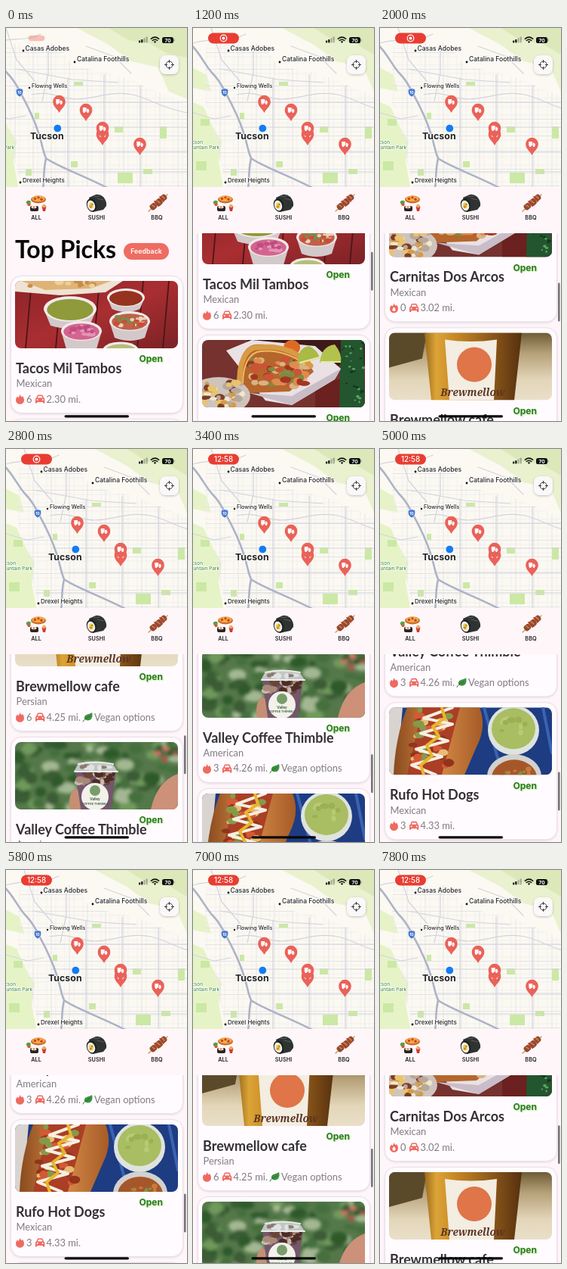
Animation, 240 px wide and 519 px high, one loop 8000 ms. Source, as an HTML page:

```html
<!DOCTYPE html>
<html lang="en">
<head>
<meta charset="utf-8">
<title>Food truck finder</title>
<style>
  html, body { margin: 0; width: 100%; height: 100%; overflow: hidden; background: #fff6fa; }
  #stage { display: block; width: 100vw; height: 100vh; }
  text { font-family: Lato, sans-serif; }
  .ui, .label, .open { font-family: Inter, sans-serif; }
  .label { font-weight: 500; fill: #222; stroke: #fff; stroke-width: 1.6; paint-order: stroke; stroke-linejoin: round; }
  .title { font-size: 18px; font-weight: 700; fill: #333136; }
  .info { font-size: 12.9px; fill: #807c84; }
  .open { font-size: 12px; font-weight: 700; fill: #277d1e; text-shadow: 1px 1px 2px #c4e6a4; }
  .category { font-size: 7.3px; font-weight: 600; fill: #222; text-anchor: middle; }
  .card { fill: #fffbfe; stroke: #e9e1e8; filter: drop-shadow(0 1px 1.5px #b9b0ba70); }
  .line { fill: none; stroke-linecap: round; stroke-linejoin: round; }
</style>
</head>
<body>
<svg id="stage" viewBox="0 0 240 519" preserveAspectRatio="none">
  <defs>
    <clipPath id="listClip"><rect y="271" width="240" height="248"/></clipPath>
    <clipPath id="mapClip"><rect width="240" height="210"/></clipPath>
    <clipPath id="photoClip"><rect width="216" height="89" rx="8"/></clipPath>
    <filter id="blur" x="-20%" y="-20%" width="140%" height="140%"><feGaussianBlur stdDeviation="2.2"/></filter>
    <filter id="lift" x="-30%" y="-30%" width="160%" height="170%"><feDropShadow dx="0" dy="1" stdDeviation="1.5" flood-opacity=".25"/></filter>
    <pattern id="streets" width="24" height="22" patternUnits="userSpaceOnUse">
      <path d="M0 5H24M0 16H24M6 0V22M18 0V22" stroke="#efedef" stroke-width=".7"/>
      <path d="M0 10.5H24M12 0V22" stroke="#e2e1e7" stroke-width=".9"/>
    </pattern>
    <linearGradient id="amber" x2="1"><stop stop-color="#9a6a1c"/><stop offset=".12" stop-color="#dca437"/><stop offset=".3" stop-color="#c98a25"/><stop offset=".8" stop-color="#7a4a16"/><stop offset="1" stop-color="#55300f"/></linearGradient>
    <linearGradient id="cafe" x2="0" y2="1"><stop stop-color="#6d5c36"/><stop offset=".3" stop-color="#b5a078"/><stop offset=".7" stop-color="#e3d6b9"/><stop offset="1" stop-color="#e9dfc9"/></linearGradient>
    <linearGradient id="bun" x2="1"><stop stop-color="#8a4a1e"/><stop offset=".5" stop-color="#d58b47"/><stop offset="1" stop-color="#a65b27"/></linearGradient>
    <linearGradient id="table" x2="1" y2="1"><stop stop-color="#8c2428"/><stop offset=".5" stop-color="#a92e31"/><stop offset="1" stop-color="#7a2226"/></linearGradient>
    <g id="pin">
      <path d="M0 13C-3 7-8.3 5-8.3-2A8.3 8.3 0 0 1 8.3-2C8.3 5 3 7 0 13Z" fill="#ea6259"/>
      <path d="M-4.2-5H.6V.6H-4.2ZM1.2-3.2H3L4.3-1.4V.6H1.2Z" fill="#fff"/>
      <circle cx="-2.4" cy=".9" r="1.2" fill="#fff"/><circle cx="2.5" cy=".9" r="1.2" fill="#fff"/>
    </g>
    <path id="flame" d="M5.5 0C6 2.4 7 3 8 4 8.6 3.5 8.6 2.8 8.6 2.3 10.3 4 11 6 11 8A5.5 5.3 0 0 1 0 8C0 5.3 1.4 4.5 2 3 2.6 3.5 3 4 3.2 4.7 4.8 3.4 5.3 2 5.5 0Z" fill="#ee6a61"/>
    <g id="hollow"><use href="#flame"/><path d="M5.6 5.5C8.4 8 8 11 5.5 11.2 3 11 2.6 8 5.6 5.5Z" fill="#fffbfe"/></g>
    <g id="car">
      <path d="M2.4 1.2Q2.8 0 4 0H8.3Q9.5 0 10 1.2L11 4Q12.3 4.5 12.3 6V11H10V9.4H2.3V11H0V6Q0 4.5 1.3 4Z" fill="#ee6a61"/>
      <path d="M2.9 4 3.8 1.6H8.5L9.4 4Z" fill="#fffbfe"/>
      <circle cx="2.6" cy="6.6" r="1" fill="#fffbfe"/><circle cx="9.7" cy="6.6" r="1" fill="#fffbfe"/>
    </g>
    <g id="leaf">
      <path d="M2 8C1 2 8 3 12 0 14 7 10 12 4 10Z" fill="#3c9140"/>
      <path d="M0 12C2 8 5 7 9 5" class="line" stroke="#286b2c"/>
    </g>
  </defs>

  <rect width="240" height="519" fill="#fff6fa"/>

  <g clip-path="url(#listClip)">
    <g id="list">
      <text x="12" y="304" font-size="32" font-weight="700" fill="#080808">Top Picks</text>
      <rect x="156" y="284" width="60" height="22" rx="11" fill="#ef6c62"/>
      <text class="ui" x="186" y="298.2" font-size="8.8" font-weight="600" fill="#fff" text-anchor="middle">Feedback</text>
      <g id="cards"></g>
    </g>
  </g>
  <rect id="thumb" x="236" width="2.6" height="51" rx="1.3" fill="#77727a"/>

  <g clip-path="url(#mapClip)">
    <g id="map">
      <rect x="-5" width="275" height="210" fill="#fbf9f1"/>
      <path d="M-5 96 14 104 26 130 38 150 34 176 40 210H-5ZM-5 50 18 62 24 84-5 78Z" fill="#e6f3c6"/>
      <path d="M118 0H270V96L240 84 226 52 190 44 160 22Z" fill="#eaf1cf"/>
      <path d="M160 0H270V40L238 34 214 20 186 16Z" fill="#dde8ba"/>
      <path d="M18 20H92L112 50 172 62 225 84 270 104V210H44L30 150 14 90Z" fill="url(#streets)"/>
      <path d="M110 176h9v8h-9ZM168 130h11v8h-11ZM228 130h9v16h-9ZM114 71h12v5h-12ZM172 191h20v14h-20ZM62 112h6v8h-6ZM10 120h12v9h-12ZM4 176h14v12h-14ZM206 186h12v7h-12ZM50 186h8v9h-8Z" fill="#cbe8a5"/>
      <g class="line" stroke="#d3d3de" stroke-width="1.2">
        <path d="M24 0 38 42 62 70M80 30V60L72 96M106 66V210M154 62V210M202 76V210M36 54 112 68 172 72M50 98H264M60 131H264M72 163H264M40 190H264"/>
        <path d="M58 88C84 82 96 94 118 94S166 82 192 88 224 104 264 112M0 20C30 12 52 18 70 8M130 24 168 38 190 60M0 112 28 120 50 116"/>
      </g>
      <g class="line" stroke="#adb3c7" stroke-width="2.6">
        <path d="M-5 20C8 30 16 50 26 60S38 76 44 87 60 116 67 138 72 160 77 172C90 182 130 196 160 212M77 172C73 190 75 200 73 212"/>
      </g>
      <path d="M37.5 81Q42 78.5 46.5 81 48 88 42 91 36 88 37.5 81Z" fill="#4677cd" stroke="#fff" stroke-width=".6"/>
      <text class="ui" x="42" y="87" font-size="5.2" font-weight="700" fill="#fff" text-anchor="middle">10</text>
      <g fill="#111"><circle cx="47" cy="30" r="1.4"/><circle cx="115" cy="45" r="1.4"/><circle cx="55" cy="79" r="1.2"/><circle cx="43" cy="204" r="1.4"/></g>
      <text class="label" x="49.5" y="30" font-size="8.5">Casas Adobes</text>
      <text class="label" x="118" y="44" font-size="8.5">Catalina Foothills</text>
      <text class="label" x="58" y="79" font-size="7.2">Flowing Wells</text>
      <text class="label" x="46" y="203.5" font-size="8">Drexel Heights</text>
      <g font-size="6.4" text-anchor="end">
        <text class="label" x="13" y="153" style="fill:#4a9145">Tucson</text>
        <text class="label" x="35" y="160" style="fill:#4a9145">Mountain Park</text>
      </g>
      <text class="label" x="56" y="146.5" font-size="12.4" style="font-weight:700">Tucson</text>
      <circle cx="92.3" cy="132.5" r="5.3" fill="#147bf3" stroke="#fff" stroke-width=".8"/>
      <use href="#pin" x="94.5" y="99"/><use href="#pin" x="130" y="110"/>
      <use href="#pin" x="152" y="142"/><use href="#pin" x="152" y="134"/>
      <use href="#pin" x="201.5" y="155"/>
    </g>
  </g>

  <g id="pill">
    <rect x="20" y="6.5" width="41" height="14" rx="7" fill="#e93d33"/>
    <g id="record"><circle cx="40.5" cy="13.5" r="4.3" fill="none" stroke="#fff" stroke-width="1.2"/><circle cx="40.5" cy="13.5" r="2" fill="#fff"/></g>
    <text id="clock" class="ui" x="40.5" y="17" font-size="9.8" font-weight="500" fill="#fff" text-anchor="middle">12:58</text>
  </g>
  <g fill="#111">
    <rect x="176" y="16.5" width="2.2" height="3" rx=".7"/><rect x="179.2" y="15" width="2.2" height="4.5" rx=".7"/>
    <g opacity=".3"><rect x="182.4" y="13.3" width="2.2" height="6.2" rx=".7"/><rect x="185.6" y="11.5" width="2.2" height="8" rx=".7"/></g>
    <path d="M197.5 20 195.8 18Q197.5 16.6 199.2 18Z"/>
    <path d="M194.2 16.5Q197.5 13.8 200.8 16.5M192.3 14.3Q197.5 10 202.7 14.3" class="line" stroke="#111" stroke-width="1.5"/>
    <rect x="207" y="12" width="15" height="8" rx="2.6"/><rect x="222.5" y="14.5" width="1" height="3" rx=".5" opacity=".5"/>
  </g>
  <text class="ui" x="214.5" y="18.5" font-size="6.6" font-weight="700" fill="#fff" text-anchor="middle">70</text>
  <rect x="204" y="36" width="25" height="25" rx="8" fill="#faf8f8" filter="url(#lift)"/>
  <path d="M212 48.5a4.5 4.5 0 1 0 9 0a4.5 4.5 0 1 0-9 0M216.5 42.5V45.5M216.5 51.5V54.5M210.5 48.5H213.5M219.5 48.5H222.5" class="line" stroke="#333" stroke-width="1"/>

  <rect y="210" width="240" height="61" fill="#fff6fa"/>
  <g>
    <ellipse cx="43" cy="226.5" rx="10" ry="5" fill="#c9682b"/><ellipse cx="43" cy="225.5" rx="8.5" ry="3.8" fill="#f0ae40"/>
    <circle cx="38.5" cy="225.5" r="1.7" fill="#d13c2a"/><circle cx="43" cy="223.8" r="1.6" fill="#d13c2a"/><circle cx="47" cy="226.3" r="1.7" fill="#d13c2a"/>
    <path d="M26.5 230Q29 226 33 229L32 233H28Z" fill="#5b9d40"/><path d="M28 232H33L32 235H29Z" fill="#d75c31"/>
    <rect x="32" y="235" width="11" height="7" rx="2" fill="#2b2523"/><ellipse cx="37" cy="236.5" rx="3.6" ry="1.8" fill="#f7eee0"/><circle cx="37" cy="236.5" r="1.2" fill="#ea7a35"/>
    <path d="M47.5 235.5H53.5L52 242H49Z" fill="#cf3a31"/><circle cx="50.5" cy="235" r="2.3" fill="#e9ac5b"/>
  </g>
  <g>
    <path d="M110 224 119 220Q124 219 129 223 134 229 133 235L129 240 115 243Z" fill="#2f3331"/>
    <path d="M117 222.5 124 222M121 225 129 227" class="line" stroke="#5a635e"/>
    <ellipse cx="113.5" cy="234" rx="6.5" ry="9" transform="rotate(-18 113.5 234)" fill="#1d201e"/>
    <ellipse cx="113" cy="234.5" rx="5" ry="7" transform="rotate(-18 113 234.5)" fill="#f5f0e6"/>
    <ellipse cx="113" cy="234.5" rx="2.8" ry="3.8" fill="#f2c83e"/><circle cx="112.3" cy="236" r="1.6" fill="#e57b37"/><circle cx="114.3" cy="233" r="1.2" fill="#6fa845"/>
  </g>
  <g>
    <path d="M189 242 214 220" class="line" stroke="#c89a62" stroke-width="1.5"/>
    <g fill="#92492c"><rect x="191" y="232" width="9" height="8" rx="3" transform="rotate(-40 195 236)"/><rect x="198" y="226" width="9" height="9" rx="3" transform="rotate(-40 202 230)"/><rect x="205" y="220" width="8" height="8" rx="3" transform="rotate(-40 209 224)"/></g>
    <path d="M194 234 197 236M200 228 204 231M207 222 210 225" class="line" stroke="#c97a4d" stroke-width="2"/>
    <path d="M197 229 202 235M204 223 209 229" class="line" stroke="#b53d2c" stroke-width="1.8"/>
  </g>
  <text class="ui category" x="40" y="253.3">ALL</text>
  <text class="ui category" x="120" y="253.3">SUSHI</text>
  <text class="ui category" x="200" y="253.3">BBQ</text>
  <rect x="77.5" y="511.2" width="85.5" height="3.2" rx="1.6" fill="#080808"/>
</svg>

<script>
const el = id => document.getElementById(id);
const clamp = x => Math.min(1, Math.max(0, x));

let seed = 7;
const rand = () => (seed = seed * 16807 % 2147483647) / 2147483647;
const box = (color, x = 0, y = 0, w = 216, h = 89) => `<rect x="${x}" y="${y}" width="${w}" height="${h}" fill="${color}"/>`;
const oval = (x, y, rx, ry, color) => `<ellipse cx="${x}" cy="${y}" rx="${rx}" ry="${ry}" fill="${color}"/>`;
const shape = (d, color) => `<path d="${d}" fill="${color}"/>`;
const stroke = (d, color, width) => `<path class="line" d="${d}" stroke="${color}" stroke-width="${width}"/>`;
const scatter = (n, x, y, w, h, r, colors) => Array.from({ length: n }, (_, i) =>
  oval(x + rand() * w, y + rand() * h, r * (.6 + rand()), r * (.5 + rand() * .6), colors[i % colors.length])).join('');

// Salsa cup seen at an angle
const cup = (x, y, r, depth, color) =>
  shape(`M${x - r} ${y}L${x - r * .74} ${y + depth}Q${x} ${y + depth + 8} ${x + r * .74} ${y + depth}L${x + r} ${y}Z`, '#d3c8ca') +
  oval(x, y, r, r * .48, '#f1ebe9') + oval(x, y + 1, r * .88, r * .4, color);

const photos = {
  salsas: () => box('url(#table)') +
    [22, 62, 112, 170, 204].map(x => stroke(`M${x} 0L${x - 8} 89`, '#4c1519', 1.8)).join('') +
    shape('M0 0H143L120 15 60 19 0 14Z', '#eee3d4') + shape('M8 0H128L100 10 40 12Z', '#dfb276') +
    scatter(12, 20, 0, 90, 7, 4, ['#c98c4c', '#ecd09a']) +
    cup(73, 37, 35, 22, '#8f9a3a') + cup(147, 22, 25, 15, '#963220') +
    cup(152, 53, 27, 22, '#c0614a') + scatter(22, 133, 47, 38, 12, 3, ['#cf4a35', '#e6d3b8', '#71904a']) +
    cup(88, 66, 27, 24, '#d3648f') + scatter(16, 70, 60, 36, 12, 3, ['#e594b5', '#c04d80']) +
    cup(140, 92, 24, 12, '#b4bf78'),

  tacos: () => box('#75322f') + box('#3d1a18', 60, 0, 156, 34) + box('#6a211f', 150, 52, 66, 37) +
    shape('M184 0H214L216 89H182Z', '#23552f') + scatter(30, 186, 2, 28, 82, 1.6, ['#5aa361', '#10391f']) +
    shape('M32 14 66 0 150 8 184 38 176 52 119 86 84 80Z', '#e9e1e4') + shape('M62 70 119 86 176 52 184 38 119 74Z', '#c9bdc8') +
    oval(119, 10, 11, 10, '#dc6a25') + oval(115, 16, 7, 5, '#eda03e') +
    shape('M48 62C46 26 56 4 76 6 104 4 138 22 148 42L116 68 62 70Z', '#b5662c') +
    scatter(60, 62, 26, 78, 36, 5, ['#a53522', '#d9b384', '#c95535', '#7c8c40', '#e08a4d']) +
    stroke('M50 62C48 30 58 8 76 10 104 6 130 18 144 34', '#d99a45', 7) +
    stroke('M54 58C54 34 62 16 78 15 100 12 124 22 136 32', '#efbb62', 2) +
    shape('M127 32Q126 10 142 8 154 14 156 24Z', '#a9ba45') + shape('M156 30Q158 8 176 6 186 18 184 30Z', '#b3c24e') +
    stroke('M130 30 155 23M158 29 183 29', '#e6eba2', 2) +
    oval(22, 74, 42, 25, '#cfc4bd') + scatter(40, 0, 56, 54, 32, 4.5, ['#efe6cd', '#d59a46', '#7d3d28', '#e9c36e', '#b8a79b']),

  brew: () => box('url(#cafe)') + shape('M0 0H50L44 34 0 46Z', '#5a4a2a') +
    shape('M47 0H176L166 89H56Z', 'url(#amber)') + shape('M74 9Q108 14 143 9L139 89H80Z', '#f3ede2') +
    oval(113, 42, 23, 23, '#df7548') +
    `<text x="111" y="84" text-anchor="middle" font-size="13.5" font-weight="700" font-style="italic" fill="#5d3524" style="font-family:'Noto Serif',serif">Brewmellow</text>`,

  iced: () => box('#55784a') + `<g filter="url(#blur)">` +
    scatter(110, 0, 0, 216, 89, 8, ['#2f5a2c', '#6f9a5c', '#a3b892', '#44703c', '#3a5b36']) +
    scatter(4, 186, 8, 28, 16, 4, ['#b9504c', '#d77468']) + `</g>` +
    shape('M180 89Q188 52 216 42V89Z', '#cd9079') + oval(80, 80, 8, 18, '#c58f74') +
    shape('M80 39H134L126 95H88Z', '#75566c') + scatter(34, 84, 38, 46, 16, 4, ['#4d2d25', '#a98a78', '#6a4535', '#c9b8b4']) +
    shape('M83 30Q106 23 130 30L136 39H78Z', '#c3c6c4') + scatter(8, 88, 30, 38, 5, 4, ['#8b7a70', '#dfe2e0']) +
    stroke('M79 39H136M84 29Q106 24 130 29', '#eceeec', 2) +
    oval(106, 72, 18, 18, '#f2f1ea') + oval(106, 64, 7, 7, '#7a9c6b') +
    `<g text-anchor="middle" font-weight="700" fill="#355d3d"><text x="106" y="77" font-size="5">Valley</text><text x="106" y="82.5" font-size="4.3">COFFEE THIMBLE</text></g>`,

  hotdog: () => box('#1d3c82') + stroke('M126 0 150 89M204 0 216 60', '#3a63b2', 4) +
    shape('M0 0H18L10 89H0Z', '#d9d4cf') +
    shape('M24 0H120Q130 25 116 52L100 89H6Q8 40 24 0Z', 'url(#bun)') +
    shape('M44 0H94L70 89H24Z', '#aa3f25') + scatter(36, 30, 2, 50, 84, 5, ['#d65835', '#e7bc75', '#92331c', '#86994a']) +
    stroke('M84 0 46 14 84 22 42 34 78 44 36 55 70 65 30 76 62 89', '#f6efe0', 4) +
    stroke('M70 0 74 14 58 25 66 38 50 50 57 64 42 76 46 89', '#e9b52c', 4) +
    oval(165, 30, 34, 33, '#dfe3df') + oval(165, 28, 29, 27, '#a9bd62') + scatter(10, 147, 12, 34, 30, 4, ['#b9ca76', '#9cb052']) +
    oval(166, 91, 36, 29, '#d2d1cd') + oval(166, 93, 30, 24, '#a5572a') + scatter(9, 146, 78, 40, 11, 3, ['#ca7b3b', '#7e9444'])
};

const trucks = [
  ['salsas', 'Tacos Mil Tambos', 'Mexican', 6, '2.30'],
  ['tacos', 'Carnitas Dos Arcos', 'Mexican', 0, '3.02'],
  ['brew', 'Brewmellow cafe', 'Persian', 6, '4.25', true],
  ['iced', 'Valley Coffee Thimble', 'American', 3, '4.26', true],
  ['hotdog', 'Rufo Hot Dogs', 'Mexican', 3, '4.33']
];
const CARD_TOP = 327, CARD_STEP = 189;

el('cards').innerHTML = trucks.map(([photo, name, food, votes, miles, vegan], i) => `
  <g transform="translate(0 ${CARD_TOP + i * CARD_STEP})">
    <rect class="card" x="6.5" y=".5" width="228" height="181" rx="14"/>
    <g transform="translate(12 7)" clip-path="url(#photoClip)">${photos[photo]()}</g>
    <text class="open" x="176.5" y="114.3">Open</text>
    <text class="title" x="13" y="129">${name}</text>
    <text class="info" x="13.5" y="147.3">${food}</text>
    <use href="#${votes ? 'flame' : 'hollow'}" x="13" y="156.5"/>
    <text class="info" x="27" y="167.5">${votes}</text>
    <use href="#car" x="39" y="157.5"/>
    <text class="info" x="53.5" y="167.5">${miles} mi.</text>
    ${vegan ? '<use href="#leaf" x="102" y="157"/><text class="info" x="117" y="167.5">Vegan options</text>' : ''}
  </g>`).join('') +
  `<rect class="card" x="6.5" y="${CARD_TOP + trucks.length * CARD_STEP + .5}" width="228" height="181" rx="14"/>`;

// Scroll offsets in px at given ms, joined by a monotone cubic
const stops = [[0, 0], [400, 0], [1200, 111], [2800, 514], [4200, 734], [5800, 754], [7000, 463], [7800, 313]];
const slope = i => (stops[i + 1][1] - stops[i][1]) / (stops[i + 1][0] - stops[i][0]);
function tangent(i) {
  if (i === 0) return 0;
  if (i === stops.length - 1) return slope(i - 1);
  const a = slope(i - 1), b = slope(i);
  return a * b <= 0 ? 0 : 2 * a * b / (a + b);
}
function scrollAt(t) {
  let i = 0;
  while (i < stops.length - 2 && t > stops[i + 1][0]) i++;
  const [t0, y0] = stops[i], [t1, y1] = stops[i + 1];
  const h = t1 - t0, u = (t - t0) / h, v = 1 - u;
  return v * v * ((1 + 2 * u) * y0 + u * h * tangent(i)) + u * u * ((3 - 2 * u) * y1 - v * h * tangent(i + 1));
}

const LOOP = 8000, TICK = 200;
const start = performance.now();
function draw() {
  const t = Math.floor((performance.now() - start) % LOOP / TICK) * TICK;
  const scroll = scrollAt(t);
  el('list').setAttribute('transform', `translate(0 ${-scroll})`);
  el('thumb').setAttribute('y', 273 + scroll * .205);
  el('thumb').setAttribute('opacity', t > 400 ? 1 : 0);
  el('map').setAttribute('transform', `translate(${-24 * (1 - clamp(t / 600)) ** 2} 0)`);

  const grow = clamp(t / 400), size = .53 + .47 * grow;
  el('pill').setAttribute('transform', `translate(40.5 13.5) scale(${size}) translate(-40.5 -13.5)`);
  el('pill').setAttribute('opacity', .3 + .7 * grow);
  el('record').setAttribute('opacity', t > 0 && t < 3400 ? 1 : 0);
  el('clock').setAttribute('opacity', t >= 3400 ? 1 : 0);
  requestAnimationFrame(draw);
}
draw();
</script>
</body>
</html>
```
